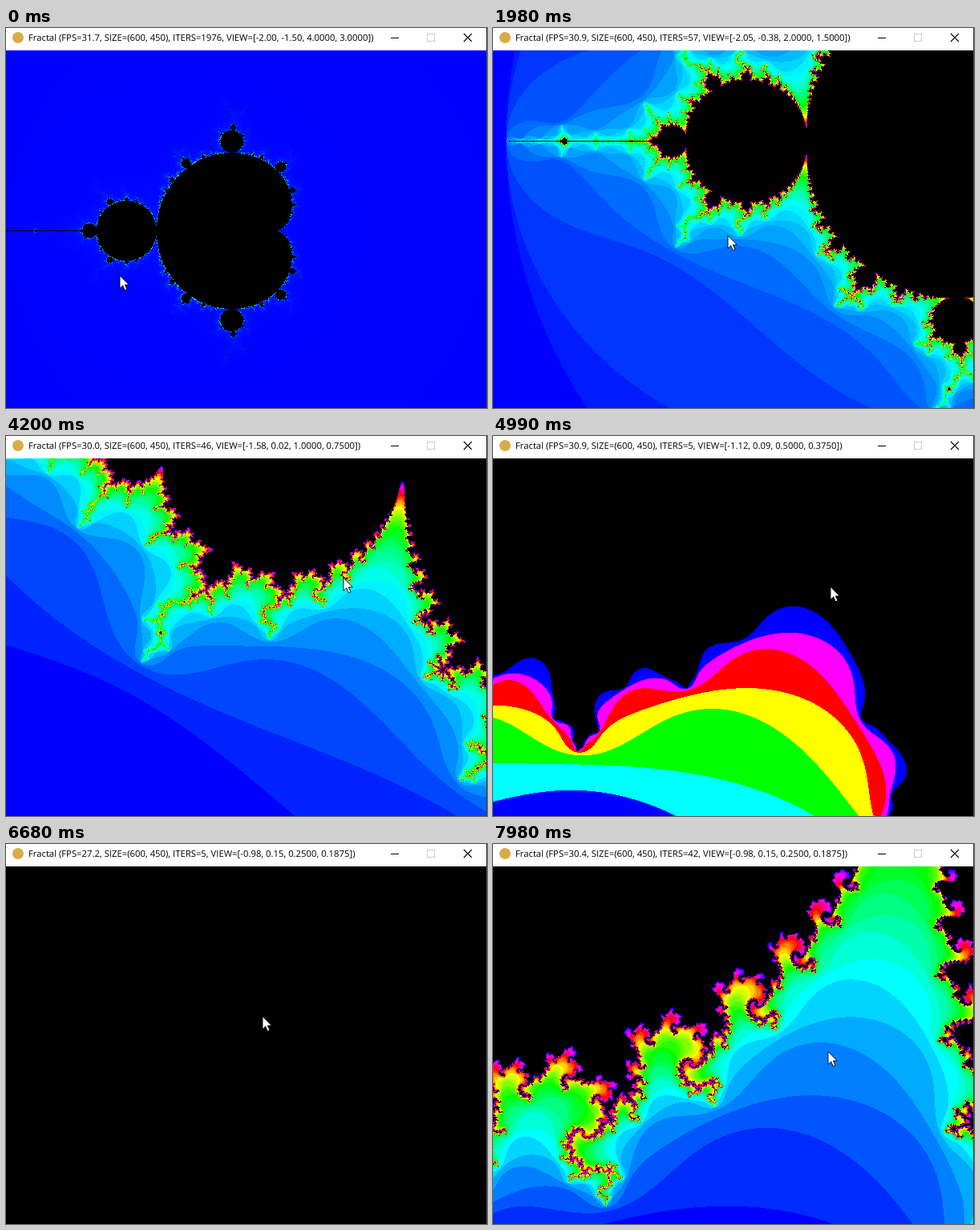
An HTML page with a canvas for the animation above (8 s loop, 600 by 475 pixels).

```html
<!DOCTYPE html>
<html lang="en">
<head>
<meta charset="utf-8">
<title>Fractal</title>
<style>
  html, body { margin: 0; width: 100%; height: 100%; overflow: hidden; background: #fff; }
  #stage { position: relative; width: 600px; height: 475px; overflow: hidden; background: #fff; }
  #stage > * { position: absolute; }
  canvas { left: 0; top: 28px; }
  #title {
    left: 28px; top: 0; white-space: pre; color: #000;
    font: 11.3px/26px "Open Sans", "Noto Sans", sans-serif;
    text-rendering: geometricPrecision;
  }
  svg { left: 0; top: 0; }
</style>
</head>
<body>
<div id="stage">
  <canvas width="600" height="450"></canvas>
  <div id="title"></div>
  <svg width="600" height="475" fill="none">
    <circle cx="15" cy="12" r="7" fill="#d8ac48"/>
    <path d="M480 12.5h10" stroke="#000"/>
    <rect x="525.5" y="7.5" width="9" height="9" stroke="#ccc"/>
    <path d="M571 7l10 10m0-10l-10 10" stroke="#000" stroke-width="1.1"/>
    <path d="M599.5 0V475" stroke="#444"/>
    <path id="cursor" d="M0 .5V16.5L3.7 13L6.3 19L9 17.8L6.4 12H11.4Z" fill="#fff" stroke="#000" stroke-width=".9"/>
  </svg>
</div>
<script>
const WIDTH = 600, HEIGHT = 450, LOOP = 8000, FIRST_HOLD = 130, STEP = 76.96;
const canvas = document.querySelector('canvas');
const ctx = canvas.getContext('2d');
const image = ctx.createImageData(WIDTH, HEIGHT);
const pixels = new Uint32Array(image.data.buffer);
const titleBar = document.getElementById('title');
const cursor = document.getElementById('cursor');

// A click centres the view on the pixel and halves its size.
const zoom = ([x, y, w, h], px, py) =>
  [x + w * px / WIDTH - w / 4, y + h * py / HEIGHT - h / 4, w / 2, h / 2];

function insideMainBulbs(x, y) {
  const q = (x - 0.25) ** 2 + y * y;
  return q * (q + x - 0.25) < y * y / 4 || (x + 1) ** 2 + y * y < 1 / 16;
}

// Step at which the orbit leaves radius 2, or 0 if it stays.
function escapeStep(cx, cy, limit) {
  if (insideMainBulbs(cx, cy)) return 0;
  let x = 0, y = 0;
  for (let n = 1; n <= limit; n++) {
    const nextX = x * x - y * y + cx;
    y = 2 * x * y + cy;
    x = nextX;
    if (x * x + y * y > 4) return n;
  }
  return 0;
}

function makeScene(view, start, msPerIter, firstIter, limit, titleLag = 0) {
  const [left, top, w, h] = view;
  const steps = new Uint16Array(WIDTH * HEIGHT);
  let min = limit;
  for (let py = 0, i = 0; py < HEIGHT; py++) {
    for (let px = 0; px < WIDTH; px++, i++) {
      const n = escapeStep(left + w * px / WIDTH, top + h * py / HEIGHT, limit);
      steps[i] = n;
      if (n && n < min) min = n;
    }
  }
  return { view, start, msPerIter, firstIter, titleLag, steps, min };
}

const view0 = [-2, -1.5, 4, 3];
const view1 = zoom(view0, 142, 281);
const view2 = zoom(view1, 293, 231);
const view3 = zoom(view2, 425, 156);
const view4 = zoom(view3, 320, 187);
const scenes = [
  makeScene(view0, 0, Infinity, 1976, 1977),
  makeScene(view1, 129, 33, 1, 90),
  makeScene(view2, 2797, 30.5, 0, 70),
  makeScene(view3, 4679, 30.5, 0, 70, 5),
  makeScene(view4, 6460, 35.35, 0, 60, 1)
];

// Rows of time followed by values.
const cursorKeys = [
  [0, 142, 309], [350, 142, 309], [1400, 293, 259], [3250, 293, 259], [4200, 421, 177],
  [4700, 425, 184], [5610, 408, 200], [6400, 320, 215], [6800, 320, 215], [7980, 418, 259]
];
const fpsKeys = [
  [0, 31.7], [1980, 30.9], [2980, 30.2], [4200, 30], [5610, 31.5], [6680, 27.2], [7980, 30.4]
];

function sample(keys, time) {
  const i = keys.findIndex(key => key[0] > time);
  if (i < 0) return keys[keys.length - 1].slice(1);
  const a = keys[i - 1], b = keys[i];
  const p = (time - a[0]) / (b[0] - a[0]);
  const eased = p * p * (3 - 2 * p);
  return a.slice(1).map((v, j) => v + (b[j + 1] - v) * eased);
}

// Fully saturated hue as a packed ABGR pixel.
function hueColor(hue) {
  const channel = offset => {
    const k = (hue + offset + 720) / 60 % 6;
    return Math.round(255 * Math.min(1, Math.max(0, Math.abs(k - 3) - 1)));
  };
  return (255 << 24 | channel(120) << 16 | channel(240) << 8 | channel(0)) >>> 0;
}

// The hue runs once round the wheel from the first visible step to the last.
function paint(scene, iters) {
  const last = iters + 1;
  const span = Math.max(1, last - scene.min);
  const palette = new Uint32Array(2000).fill(0xff000000);
  for (let n = scene.min; n <= last; n++) {
    palette[n] = hueColor(240 - 360 * (n - scene.min) / span);
  }
  for (let i = 0; i < pixels.length; i++) pixels[i] = palette[scene.steps[i]];
  ctx.putImageData(image, 0, 0);
}

let shown = -1;
function draw(t) {
  const index = t < FIRST_HOLD ? 0 : 1 + Math.floor((t - 118) / STEP);
  if (index === shown) return;
  shown = index;
  const time = index ? FIRST_HOLD + (index - 1) * STEP : 0;
  const scene = scenes.filter(s => s.start <= time).pop();
  const iters = scene.firstIter + Math.round((time - scene.start) / scene.msPerIter);
  paint(scene, iters);

  const [x, y, w, h] = scene.view;
  const [fps] = sample(fpsKeys, time);
  titleBar.textContent = `Fractal (FPS=${fps.toFixed(1)}, SIZE=(600, 450), ` +
    `ITERS=${Math.max(1, iters - scene.titleLag)}, VIEW=[${x.toFixed(2)}, ${y.toFixed(2)}, ` +
    `${w.toFixed(4)}, ${h.toFixed(4)}])`;
  const [cx, cy] = sample(cursorKeys, time).map(Math.round);
  cursor.setAttribute('transform', `translate(${cx} ${cy})`);
}

const begin = performance.now();
function tick() {
  draw((performance.now() - begin) % LOOP);
  requestAnimationFrame(tick);
}
tick();
</script>
</body>
</html>
```
